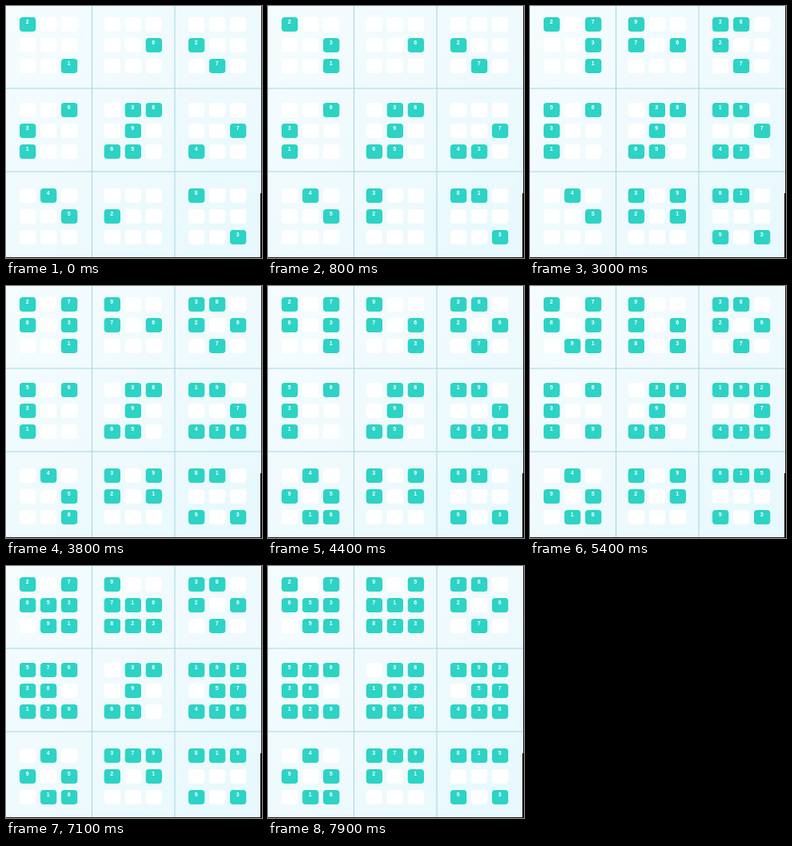
These frames come from a looping animation (320x315 px, 8000 ms). An HTML page:

```html
<!DOCTYPE html>
<html lang="en">
<head>
<meta charset="utf-8">
<title>Number grid filling in</title>
<style>
  html, body { margin: 0; width: 100%; height: 100%; overflow: hidden; }
  svg { display: block; width: 100vw; height: 100vh; }
  text { font: bold 7px "Liberation Sans", Arial, sans-serif; fill: #fff; text-anchor: middle; }
</style>
</head>
<body>
<svg id="stage" viewBox="0 0 320 315" preserveAspectRatio="none">
  <defs>
    <linearGradient id="sky" x1="0" y1="0" x2="1" y2="1">
      <stop offset="0" stop-color="#f5fcfe"/>
      <stop offset=".5" stop-color="#effafd"/>
      <stop offset="1" stop-color="#e6f9fe"/>
    </linearGradient>
  </defs>
  <rect width="320" height="315" fill="url(#sky)"/>
  <path d="M107.5 0V314M211 0V314M0 103H319M0 207H319" stroke="#a3d5e2" fill="none"/>
  <path d="M319.5 0V315M0 314.5H320" stroke="#1c2022" fill="none"/>
  <path d="M319 234V315" stroke="#000" stroke-width="2"/>
  <g id="cells"></g>
</svg>
<script>
const LOOP = 8000;
const SVG = 'http://www.w3.org/2000/svg';
const cells = document.getElementById('cells');

const givens = [
  '2........', '.....62..', '..1....7.',
  '..6.38...', '3...9...7', '1..65.4..',
  '.4....8..', '..52.....', '........3'
];

// Placements in order: row, column, digit
const moves = `
  781 233 683 743 415 137 247 149 489 769 979
  471 861 173 188 218 698 938 299 819 921 363
  348 329 639 492 795 225 585 427 757 528 251 352 622
  165 667 541 562`.trim().split(/\s+/);

const moveTime = k => Math.ceil((202 * k - 56) / 100) * 100;

function add(parent, tag, attrs) {
  const el = document.createElementNS(SVG, tag);
  for (const name in attrs) el.setAttribute(name, attrs[name]);
  return parent.appendChild(el);
}

function position(row, col) {
  const bx = Math.floor(col / 3), by = Math.floor(row / 3);
  return {
    x: [17, 122.7, 228][bx] + col % 3 * 26,
    y: 14 + by * 107 + row % 3 * 26
  };
}

function tile(parent, row, col, fill) {
  const { x, y } = position(row, col);
  add(parent, 'rect', { x, y, width: 20.3, height: 18, rx: 4, fill });
}

function numberTile(row, col, digit) {
  const group = add(cells, 'g', {});
  const { x, y } = position(row, col);
  tile(group, row, col, '#2dd3c4');
  add(group, 'text', { x: x + 9.6, y: y + 7.8 }).textContent = digit;
  return group;
}

for (let row = 0; row < 9; row++) {
  for (let col = 0; col < 9; col++) {
    const digit = givens[row][col];
    if (digit === '.') tile(cells, row, col, '#fff');
    else numberTile(row, col, digit);
  }
}

moves.forEach((move, i) => {
  const [row, col, digit] = move;
  const offset = moveTime(i + 1) / LOOP;
  numberTile(row - 1, col - 1, digit).animate([
    { opacity: 0, offset: 0 },
    { opacity: 0, offset },
    { opacity: 1, offset },
    { opacity: 1, offset: 1 }
  ], { duration: LOOP, iterations: Infinity });
});
</script>
</body>
</html>
```
